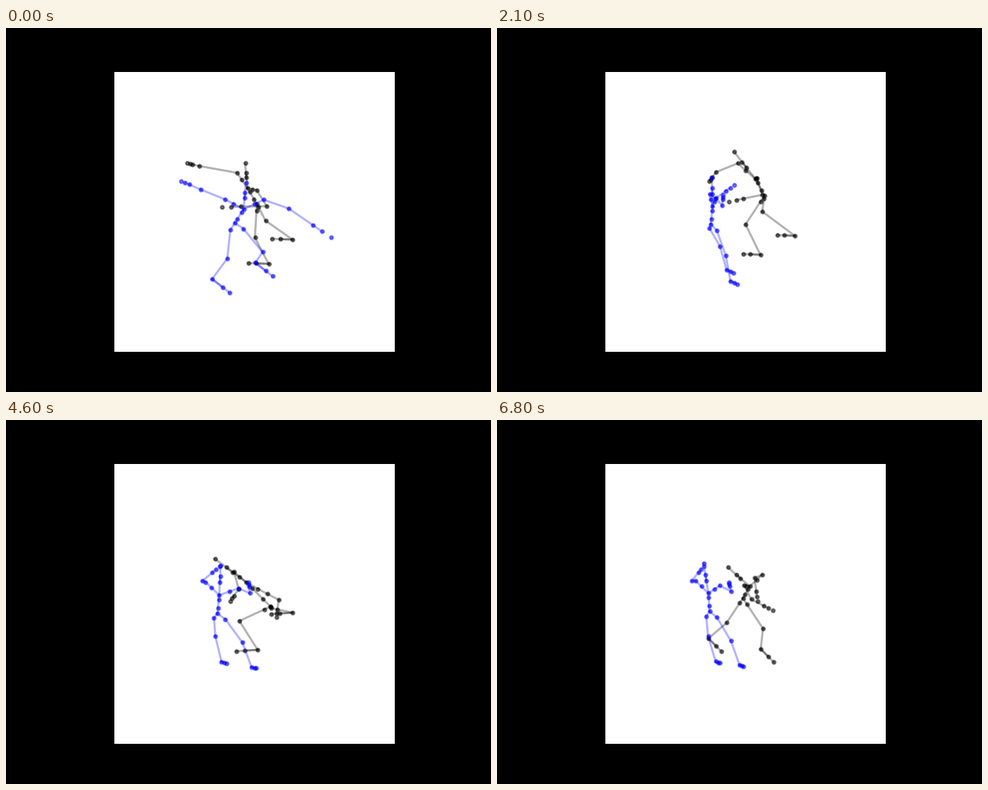
A matplotlib script for the animation above (6.9 s loop, 640 by 480 pixels).

```python
import numpy as np
import matplotlib.pyplot as plt
from matplotlib.animation import FuncAnimation
from matplotlib.collections import LineCollection

W, H, DPI = 640, 480, 100
FRAMES, STEP_MS = 69, 100
TENSION = 0.6

# Rows of a pose
PELVIS, CHEST, TOP = 0, 1, 2
ARM_L, ARM_R = (3, 4, 5), (6, 7, 8)       # shoulder, elbow, wrist
LEG_L, LEG_R = (9, 10), (11, 12)          # knee, ankle
TOE = 13                                  # shared vector from ankle to toe


def mix(a, b, u):
    return a + u * (b - a)


def build_arm(chest, shoulder, elbow, wrist):
    tip = mix(elbow, wrist, 1.75)
    return [chest, mix(chest, shoulder, 0.55), shoulder, elbow, wrist,
            mix(wrist, tip, 0.5)], tip


def build_leg(pelvis, knee, ankle, toe, spread):
    hip = mix(pelvis, knee, 0.2) + (spread, 0)
    return [pelvis, hip, knee, ankle, ankle + 0.6 * toe], ankle + toe


def build(p, spread):
    """Turn key points into bones and dots."""
    pelvis, chest, top = p[:3]
    neck = mix(chest, top, 0.43)
    spine = [pelvis, mix(pelvis, chest, 0.3), mix(pelvis, chest, 0.75),
             chest, neck, mix(neck, top, 0.35)]
    chains, dots = [spine, [neck, top]], spine + [top]
    for rows in (ARM_L, ARM_R):
        chain, tip = build_arm(chest, *p[list(rows)])
        chains.append(chain)
        dots += chain[1:] + [tip]
    for rows, side in ((LEG_L, -1), (LEG_R, 1)):
        chain, toe = build_leg(pelvis, *p[list(rows)], p[TOE], side * spread)
        chains += [chain, [chain[3], toe]]
        dots += chain[1:] + [toe]
    bones = [pair for c in chains for pair in zip(c, c[1:])]
    return np.array(bones), np.array(dots)


class Figure:
    """A stick figure moving smoothly through timed poses."""

    def __init__(self, ax, color, z, spread):
        self.spread = spread
        self.times, self.poses, self.swings = [], [], []
        self.lines = LineCollection([], colors=color, linewidths=2, alpha=0.3,
                                    capstyle="projecting", zorder=z)
        ax.add_collection(self.lines)
        self.dots = ax.scatter([], [], s=10, c=color, alpha=0.5,
                               linewidths=1.5, zorder=z + 1)

    def key(self, t, body, arm_l, arm_r, leg_l, leg_r, toe):
        self.times.append(t)
        self.poses.append(body + arm_l + arm_r + leg_l + leg_r + [toe])

    def swing(self, rows, offset, start, end):
        self.swings.append((list(rows), np.array(offset), start, end))

    def at(self, t):
        times, poses = np.array(self.times), np.array(self.poses, float)
        slopes = TENSION * np.gradient(poses, times, axis=0)
        k = min(np.searchsorted(times, t, "right") - 1, len(times) - 2)
        h = times[k + 1] - times[k]
        u = (t - times[k]) / h
        p = (mix(poses[k], poses[k + 1], u * u * (3 - 2 * u))
             + h * u * (1 - u) * ((1 - u) * slopes[k] - u * slopes[k + 1]))
        for rows, offset, start, end in self.swings:
            if start < t < end:
                p[rows] += offset * np.sin(np.pi * (t - start) / (end - start))
        return p

    def draw(self, t):
        bones, dots = build(self.at(t), self.spread)
        self.lines.set_segments(bones)
        self.dots.set_offsets(dots)
        return self.lines, self.dots


fig = plt.figure(figsize=(W / DPI, H / DPI), dpi=DPI, facecolor="black")
side = 0.77 * H
left, top = 328 - side / 2, 0.12 * H
ax = fig.add_axes([left / W, 0.11, side / W, 0.77], facecolor="white")
ax.set(xlim=(left, left + side), ylim=(top + side, top), xticks=[], yticks=[])
ax.spines[:].set_visible(False)

black = Figure(ax, "black", 2, spread=0)
blue = Figure(ax, "blue", 4, spread=4)

# Attack: reach in, lean over, then step back.
black.key(0.0, [(331, 232), (318.5, 211), (315.5, 178.5)],
          [(305, 191), (255, 182), (246, 180)],
          [(331, 214), (344, 235), (310, 235.5)],
          [(328.5, 276.5), (346.5, 311)], [(342.5, 254), (378, 279)], (-27, -1))
black.key(2.1, [(353, 221), (341, 199), (313, 163.5)],
          [(317.5, 178.5), (289, 190), (284, 197)],
          [(343, 198), (350, 220), (325, 225)],
          [(328, 259), (347.5, 299)], [(350, 242), (393, 274)], (-23, -1))
black.key(3.7, [(356, 224), (337, 199), (274, 157)],
          [(305.5, 189.5), (305, 210.5), (308, 227)],
          [(337, 181), (375, 195), (364.5, 212)],
          [(325.5, 261.5), (328, 300)], [(354, 230.5), (397, 264)], (-28, -2))
black.key(4.6, [(349, 246), (317, 214), (275.5, 183)],
          [(301, 200.5), (307, 223), (300.5, 232)],
          [(345, 229.5), (360, 237), (358, 250)],
          [(308, 265), (332, 303)], [(350, 248), (378, 254)], (-28, 2))
black.key(5.4, [(333.5, 238), (328, 223), (306.5, 190)],
          [(295.5, 212.5), (283, 233), (294, 245)],
          [(350, 216), (377, 224), (387, 246)],
          [(305.5, 266), (326, 276.5)], [(346.5, 283), (357, 307.5)], (1, 13))
black.key(6.8, [(324.5, 235), (333.5, 219.5), (305, 194.5)],
          [(350, 204), (340, 208.5), (342, 226)],
          [(326, 218), (335.5, 236.5), (352, 245)],
          [(303, 267.5), (279, 288)], [(351, 275), (348, 302)], (17, 17))
black.swing(ARM_L[2:], (-17, 0), 0, 2.1)
black.swing(ARM_R[2:], (-10, 0), 0, 2.1)
black.swing(LEG_L, (12, 0), 0, 2.1)

# Defence: spread out, fold in, then hold guard.
blue.key(0.0, [(302, 257), (313.5, 239), (316.5, 204.5)],
         [(289, 226), (257, 213), (242, 206.5)],
         [(340, 226.5), (373, 238), (405, 260)],
         [(292, 304), (272, 331)], [(338.5, 295.5), (329, 309.5)], (23, 18))
blue.key(1.4, [(285, 259), (288, 236.5), (286, 199)],
         [(285, 221), (291.5, 226.5), (302.5, 217)],
         [(290, 225), (299.5, 235.5), (303.5, 231)],
         [(298.5, 290), (304.5, 320)], [(303, 301), (306, 333)], (11, 6))
blue.key(3.7, [(279, 256), (282.5, 232), (286, 193)],
         [(267, 214.5), (264, 213.5), (278, 202.5)],
         [(303, 223), (317.5, 229.5), (317, 221.5)],
         [(277.5, 285.5), (285, 319)], [(312, 294.5), (323.5, 327)], (7, 2))
blue.key(6.8, [(280.5, 252.5), (279, 228.5), (272.5, 189)],
         [(262, 212), (257, 212), (266, 201)],
         [(294, 218.5), (309, 226), (307, 219)],
         [(278.5, 285), (288.5, 318.5)], [(308.5, 291), (320, 323)], (5, 2))
blue.swing(LEG_L[1:], (0, 9), 0, 0.8)
blue.swing(ARM_R, (6, 0), 3.7, 6.8)
blue.swing(ARM_L, (-2, 0), 3.7, 6.8)


def update(i):
    t = i * STEP_MS / 1000
    return black.draw(t) + blue.draw(t)


anim = FuncAnimation(fig, update, frames=FRAMES, interval=STEP_MS,
                     repeat=True, repeat_delay=0)
plt.show()
```
